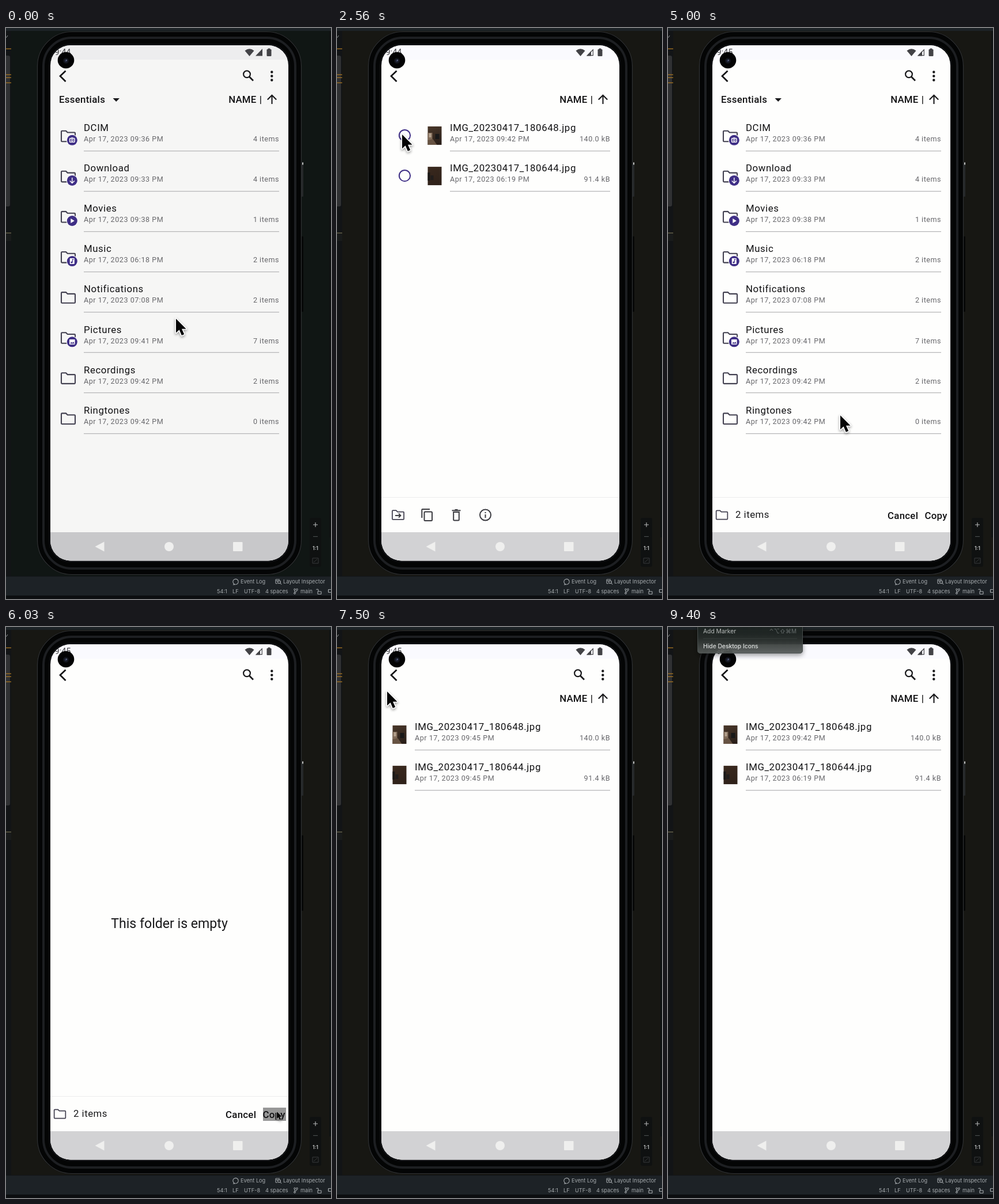
Animation of 564 by 992 pixels, one loop 9.43 s. Source, as an HTML page with a canvas:

```html
<!DOCTYPE html>
<html lang="en">
<head>
<meta charset="utf-8">
<title>File manager: copy files</title>
<style>
html, body { margin: 0; width: 100%; height: 100%; overflow: hidden; background: #171713; }
canvas { display: block; width: 564px; height: 992px; }
</style>
</head>
<body>
<canvas id="stage" width="564" height="992"></canvas>
<script>
const ctx = document.getElementById('stage').getContext('2d');
const LOOP = 9430;
const INK = '#19191b', GREY = '#66666a', PURPLE = '#3f2f86';
const ROW = 70.1;
const ROBOTO = 'Roboto, "Noto Sans", sans-serif';
const INTER = 'Inter, "Open Sans", sans-serif';

const FOLDERS = [
  ['DCIM', '09:36', 4, 'camera'], ['Download', '09:33', 4, 'down'],
  ['Movies', '09:38', 1, 'play'], ['Music', '06:18', 2, 'note'],
  ['Notifications', '07:08', 2], ['Pictures', '09:41', 7, 'image'],
  ['Recordings', '09:42', 2], ['Ringtones', '09:42', 0]
];
const FILES = [['IMG_20230417_180648.jpg', '140.0 kB'], ['IMG_20230417_180644.jpg', '91.4 kB']];

// start time, view, bottom bar
const VIEWS = [
  [0, 'home', ''], [880, 'files', ''], [2060, 'select', 'tools'], [3700, 'files', 'paste'],
  [4310, 'home', 'paste'], [5200, 'empty', 'paste'], [6060, 'copied', ''],
  [7760, 'home', ''], [8100, 'files', '']
];

// time, x, y of the pointer
const PATH = [
  [30, 295, 505], [230, 275, 588], [460, 275, 588], [560, 272, 599], [900, 272, 599],
  [1600, 449, 80], [1800, 449, 80], [2000, 459, 112], [2120, 459, 112], [2560, 113, 185],
  [2640, 113, 185], [2700, 117, 248], [2790, 117, 248], [3160, 150, 820], [3300, 150, 820],
  [3500, 151, 847], [3720, 151, 847], [4230, 95, 80], [4320, 95, 80], [5000, 299, 673],
  [5210, 299, 673], [5640, 478, 862], [5860, 470, 842], [6400, 470, 842], [7300, 96, 162],
  [7360, 96, 162], [7500, 87, 112], [7600, 80, 88], [7720, 92, 80], [7800, 92, 80],
  [8060, 300, 600], [8120, 300, 600], [8300, 390, 338], [8330, 390, 338],
  [8700, 167, 27], [9030, 167, 27], [9090, 170, -40]
];

const clamp = v => Math.max(0, Math.min(1, v));
const ramp = (t, a, b) => clamp((t - a) / (b - a));
const smooth = k => k * k * (3 - 2 * k);
const between = (t, a, b) => t >= a && t < b;

function rect(x, y, w, h, color) {
  ctx.fillStyle = color;
  ctx.fillRect(x, y, w, h);
}

function round(x, y, w, h, r, color) {
  ctx.beginPath();
  ctx.roundRect(x, y, w, h, r);
  ctx.fillStyle = color;
  ctx.fill();
}

function roundLine(x, y, w, h, r, color, width) {
  ctx.beginPath();
  ctx.roundRect(x, y, w, h, r);
  ctx.strokeStyle = color;
  ctx.lineWidth = width;
  ctx.stroke();
}

function disc(x, y, r, color) {
  ctx.beginPath();
  ctx.arc(x, y, r, 0, 7);
  ctx.fillStyle = color;
  ctx.fill();
}

function ring(x, y, r, color, width) {
  ctx.beginPath();
  ctx.arc(x, y, r, 0, 7);
  ctx.strokeStyle = color;
  ctx.lineWidth = width;
  ctx.stroke();
}

function stroke(d, color = INK, width = 2) {
  ctx.strokeStyle = color;
  ctx.lineWidth = width;
  ctx.stroke(new Path2D(d));
}

function fill(d, color = INK) {
  ctx.fillStyle = color;
  ctx.fill(new Path2D(d));
}

function at(x, y, draw, scale = 1) {
  ctx.save();
  ctx.translate(x, y);
  ctx.scale(scale, scale);
  draw();
  ctx.restore();
}

function text(s, x, y, size, { color = INK, weight = 400, gap = 0, align = 'left', font = ROBOTO } = {}) {
  ctx.font = `${weight} ${size}px ${font}`;
  ctx.letterSpacing = gap + 'px';
  ctx.textAlign = align;
  ctx.fillStyle = color;
  ctx.fillText(s, x, y);
}

const strong = (s, x, y, gap = 0.3) => text(s, x, y, 16.8, { weight: 500, gap, color: '#111113' });

function desktop(bright) {
  rect(0, 0, 564, 992, bright ? '#171713' : '#101614');
  rect(0, 0, 564, 5, '#1d2327');
  rect(0, 5, 9, 948, '#121416');
  rect(0, 356, 9, 14, '#191b1b');
  round(-4, 48, 11, 262, 3, '#303133');
  for (const y of [36, 81, 86, 95]) rect(0, y - 0.5, 9, 1.3, '#a87520');
  rect(0, 355.5, 9, 1.2, '#777052');
  stroke('M-2 18L1 16L3 13', '#8b8e90', 1);
  rect(561, 5, 3, 880, '#0e1111');

  round(527, 851, 20, 85, 3, '#0f1111');
  stroke('M533 863H541M537 859V867', '#b8babb', 1.1);
  stroke('M533 883.5H541', '#4c4f50', 1.1);
  text('1:1', 537, 907, 8.5, { font: INTER, weight: 600, align: 'center', color: '#c4c6c7' });
  stroke('M532 921H542V930H532ZM534 928L540 923', '#383b3c', 1);

  rect(0, 952, 564, 36, '#1d2226');
  rect(0, 952, 564, 1, '#111416');
  rect(0, 986, 564, 6, '#0c0e10');
  const c = '#a6abae';
  const label = (s, x, y) => text(s, x, y, 9.2, { font: INTER, color: c });
  label('Event Log', 407, 965);
  label('Layout Inspector', 481, 965);
  label('54:1', 366, 982);
  label('LF', 393, 982);
  label('UTF-8', 413, 982);
  label('4 spaces', 450, 982);
  label('main', 511, 982);
  stroke('M396 966A4.7 4.7 0 1 1 400 966.5L395 967Z', c, 1.1);
  stroke('M475 958H468V965H471M468 960.5H474', c, 1);
  ring(474, 962.5, 2.4, c, 1.1);
  stroke('M476 964L478 967M501 977V981M501 980Q505 980 505 977', c, 1);
  for (const [x, y] of [[501, 975.5], [505, 975.5], [501, 982]]) ring(x, y, 1.4, c, 1);
  roundLine(541, 979, 6, 4.5, 0.5, c, 1.1);
  stroke('M542 979V976A2 2 0 0 0 538.5 976', c, 1.1);
  roundLine(559.5, 975.5, 8, 5, 0.5, c, 1.2);
}

function phone() {
  round(512, 236, 4, 57, 1, '#26282a');
  round(512, 362, 4, 131, 1, '#060707');
  rect(514, 233.5, 2, 4, '#c5c6c6');
  round(54, 6, 459, 944, 60, '#040505');
  roundLine(54.5, 6.5, 458, 943, 60, '#303234', 1.2);
  roundLine(65, 17, 437, 922, 49, '#1d1f22', 4);
  roundLine(75.5, 28.5, 416, 898.5, 36, '#15161a', 1.5);
}

function statusBar(t, bright) {
  rect(77, 30, 413, 25, bright ? '#fafafe' : '#ededee');
  const c = '#424246';
  text(t < 3700 ? '9:44' : '9:45', 84.5, 47, 14.5, { color: c });
  fill('M414.5 39.5Q422.5 33 430.5 39.5L422.5 49Z', c);
  if (t < 2060) fill('M433 48.5L445 36V48.5Z', c);
  else {
    stroke('M434.5 47.7L444.3 37.8V47.7Z', c, 1.2);
    fill('M433 48.5L441 40V48.5Z', c);
  }
  round(452.5, 37, 8, 12, 1.2, c);
  rect(454.5, 35.5, 4, 2, c);
}

function camera() {
  disc(104, 56, 14.3, '#030304');
  disc(104, 57, 5, '#11131b');
  disc(104, 57, 2.4, '#272c42');
  disc(105, 56, 0.9, '#747c9b');
}

function navBar(bright) {
  rect(77, 876, 413, 50, bright ? '#d2d2d4' : '#c8c8ca');
  const c = '#efefee';
  fill('M154.5 901L170.5 892.5V909.5Z', c);
  disc(283, 901, 8, c);
  round(394, 893, 16.5, 16, 1, c);
}

function topBar(t, view) {
  stroke('M103.5 74.5L94 83.5L103.5 93', '#111113', 2.7);
  if (view !== 'select') {
    if (between(t, 1640, 1760)) rect(449, 70, 25, 26, '#979797');
    ring(418, 80.3, 5.9, INK, 2.2);
    stroke('M422.3 84.8L429 91.5', INK, 2.7);
    for (const y of [76.5, 83.5, 90.5]) disc(461.3, y, 2.2, INK);
  }
  if (view === 'empty') return;
  strong('NAME', 386.2, 130, 0.2);
  strong('|', 439.7, 129.5, 0);
  stroke('M461.5 132V117M453.8 124.5L461.5 116.8L469.2 124.5', INK, 2.1);
  if (view === 'home') {
    strong('Essentials', 92, 130);
    fill('M185.5 122H197L191.2 128Z');
  }
}

function folder(x, y, s = 1) {
  at(x, y, () => stroke('M-12 -8Q-12 -9.3 -10.7 -9.3H-4L-1.2 -6.5H10.7Q12 -6.5 12 -5.2V8Q12 9.3 10.7 9.3H-10.7Q-12 9.3 -12 8Z', '#424050', 2.1), s);
}

const BADGES = {
  camera() {
    roundLine(-4.2, -3, 8.4, 6.5, 1, '#fff', 1.5);
    ring(0, 0.3, 1.6, '#fff', 1.1);
    rect(-1.7, -4.5, 3.4, 1.5, '#fff');
  },
  down() { stroke('M0 -5V4M-4 0.5L0 4.5L4 0.5', '#fff', 1.4); },
  play() { fill('M-2.5 -4L4 0L-2.5 4Z', '#fff'); },
  note() {
    round(-4, -5, 8, 10, 1, '#fff');
    disc(-0.8, 2, 1.7, PURPLE);
    stroke('M0.5 2V-3H2.7', PURPLE, 1.2);
  },
  image() {
    round(-4.8, -4.2, 9.6, 8.6, 1, '#fff');
    fill('M-3.6 3L-1.4 0.2L0.3 2L2 -0.4L4 3Z', PURPLE);
  }
};

function row(i, x, title, time, size) {
  const y = i * ROW;
  text(title, x, 179 + y, 16.8, { gap: 0.6, color: '#111113' });
  text(`Apr 17, 2023 ${time} PM`, x, 197 + y, 12.6, { gap: 0.52, color: GREY });
  text(size, 474, 197 + y, 12.6, { gap: 0.5, color: GREY, align: 'right' });
  rect(x, Math.round(212.8 + y), 474 - x, 1.3, '#b8b8ba');
}

function home(t) {
  FOLDERS.forEach(([name, time, count, badge], i) => {
    const filled = t > 6060 && name === 'Ringtones';
    row(i, 135, name, filled ? '09:45' : time, (filled ? 2 : count) + ' items');
    const y = 188 + i * ROW;
    folder(108, y);
    if (badge) {
      disc(114.8, y + 6.8, 10, '#fdfdfc');
      disc(114.8, y + 6.8, 9, PURPLE);
      at(114.8, y + 6.8, BADGES[badge]);
    }
  });
}

function thumb(i, x) {
  const y = 171 + i * ROW;
  const g = ctx.createLinearGradient(x, y, x + 14, y + 32);
  g.addColorStop(0, i ? '#3a291e' : '#4a382a');
  g.addColorStop(1, i ? '#2f2119' : '#2a1f19');
  rect(x, y, 24, 32, g);
  if (i) {
    rect(x, y + 10, 4, 14, '#1a1817');
    rect(x + 5, y + 15, 5, 8, '#211d1c');
  } else {
    rect(x, y + 11, 8, 14, '#806b58');
    rect(x + 2, y + 12, 4, 7, '#b3a08d');
    fill(`M${x} ${y + 24}L${x + 9} ${y + 22}L${x + 16} ${y + 32}H${x}Z`, '#675342');
    rect(x + 13, y + 13, 7, 9, '#191919');
  }
}

function files(t, view) {
  const shift = view === 'select' ? 61 : 0;
  FILES.forEach(([name, size], i) => {
    const time = view === 'copied' ? '09:45' : ['09:42', '06:19'][i];
    row(i, 135 + shift, name, time, size);
    thumb(i, 96.5 + shift);
    if (shift) {
      const y = 186.5 + i * ROW;
      ring(117.5, y, 9.6, PURPLE, 2);
      if (t >= [2620, 2750][i]) disc(117.5, y, 5.5, PURPLE);
    }
  });
}

function bottomBar(t, kind) {
  rect(77, 815, 413, 1, '#ededee');
  if (kind === 'paste') {
    folder(93.5, 846, 0.82);
    text('2 items', 117, 851, 16.8, { gap: 0.5 });
    if (between(t, 6030, 6060)) rect(446, 835, 40, 23, '#979797');
    strong('Cancel', 381, 852.5);
    strong('Copy', 445.5, 852.5);
    return;
  }
  const c = '#3b3b40';
  folder(106, 846, 0.84);
  stroke('M101 847H110M107 843.5L110.5 847L107 850.5', c, 1.8);
  roundLine(151.5, 840.5, 13.5, 15.5, 1.5, c, 2);
  stroke('M147.3 851V837Q147.3 836 148.3 836H161', c, 2);
  stroke('M202.2 841V854Q202.2 855.5 203.7 855.5H210.3Q211.8 855.5 211.8 854V841ZM199.5 838.2H214.5M204.5 837H209.5', c, 2);
  ring(257.5, 846, 9.5, c, 2);
  stroke('M257.5 845V851M257.5 841V843', c, 2);
}

function pointer(t) {
  const i = PATH.findIndex(p => p[0] > t);
  if (i < 0) return;
  const b = PATH[i], a = PATH[Math.max(0, i - 1)];
  const k = a === b ? 0 : smooth(ramp(t, a[0], b[0]));
  const x = a[1] + (b[1] - a[1]) * k, y = a[2] + (b[2] - a[2]) * k;
  const small = between(t, 6030, 6520);
  const s = small ? 0.5 + 0.5 * ramp(t, 6400, 6520) : 1;
  at(x, y, () => {
    const arrow = new Path2D('M0 0V24.5L5.7 19.3L9.9 29L14.2 27.1L10 17.7H17.6Z');
    ctx.shadowColor = 'rgba(0,0,0,.4)';
    ctx.shadowBlur = 4;
    ctx.shadowOffsetY = 2;
    ctx.lineJoin = 'round';
    ctx.strokeStyle = between(t, 6030, 6060) ? '#b5b5b5' : '#fff';
    ctx.lineWidth = 3.2;
    ctx.stroke(arrow);
    ctx.shadowColor = 'transparent';
    ctx.fillStyle = '#050505';
    ctx.fill(arrow);
  }, s);
}

function menu(t) {
  if (t < 9030) return;
  ctx.save();
  ctx.globalAlpha = ramp(t, 9000, 9090) * (1 - 0.1 * ramp(t, 9340, 9400));
  ctx.shadowColor = 'rgba(0,0,0,.45)';
  ctx.shadowBlur = 9;
  ctx.shadowOffsetY = 3;
  const g = ctx.createLinearGradient(0, 0, 0, 46);
  g.addColorStop(0, '#1c2422');
  g.addColorStop(0.4, '#282e2c');
  g.addColorStop(1, '#595e5c');
  round(51, -12, 183, 58, 5, g);
  ctx.shadowColor = 'transparent';
  roundLine(51.5, -12, 182, 57.5, 5, '#4b5250', 1);
  rect(61, 19.5, 163, 1, '#3b4240');
  text('Add Marker', 61, 10.5, 10.3, { font: INTER, color: '#c9cccb' });
  text('⌃⌥⇧⌘M', 223, 10.5, 10, { font: 'Inter, "DejaVu Sans", sans-serif', color: '#6f7675', align: 'right' });
  text('Hide Desktop Icons', 61, 37, 10.3, { font: INTER, weight: 500, color: '#eceeed' });
  ctx.restore();
}

function draw(t) {
  const [, view, bar] = VIEWS.filter(v => v[0] <= t).pop();
  const bright = t >= 30;
  desktop(bright);
  phone();
  ctx.save();
  ctx.beginPath();
  ctx.roundRect(77, 30, 413, 895.5, 35);
  ctx.clip();
  rect(77, 30, 413, 896, bright ? '#fefefd' : '#f6f6f5');
  statusBar(t, bright);
  topBar(t, view);
  if (view === 'home') home(t);
  else if (view === 'empty') text('This folder is empty', 283.5, 523, 23.1, { align: 'center' });
  else files(t, view);
  if (bar) bottomBar(t, bar);
  navBar(bright);
  ctx.restore();
  camera();
  pointer(t);
  menu(t);
}

const start = performance.now();
function frame() {
  draw((performance.now() - start) % LOOP);
  requestAnimationFrame(frame);
}
frame();
</script>
</body>
</html>
```
